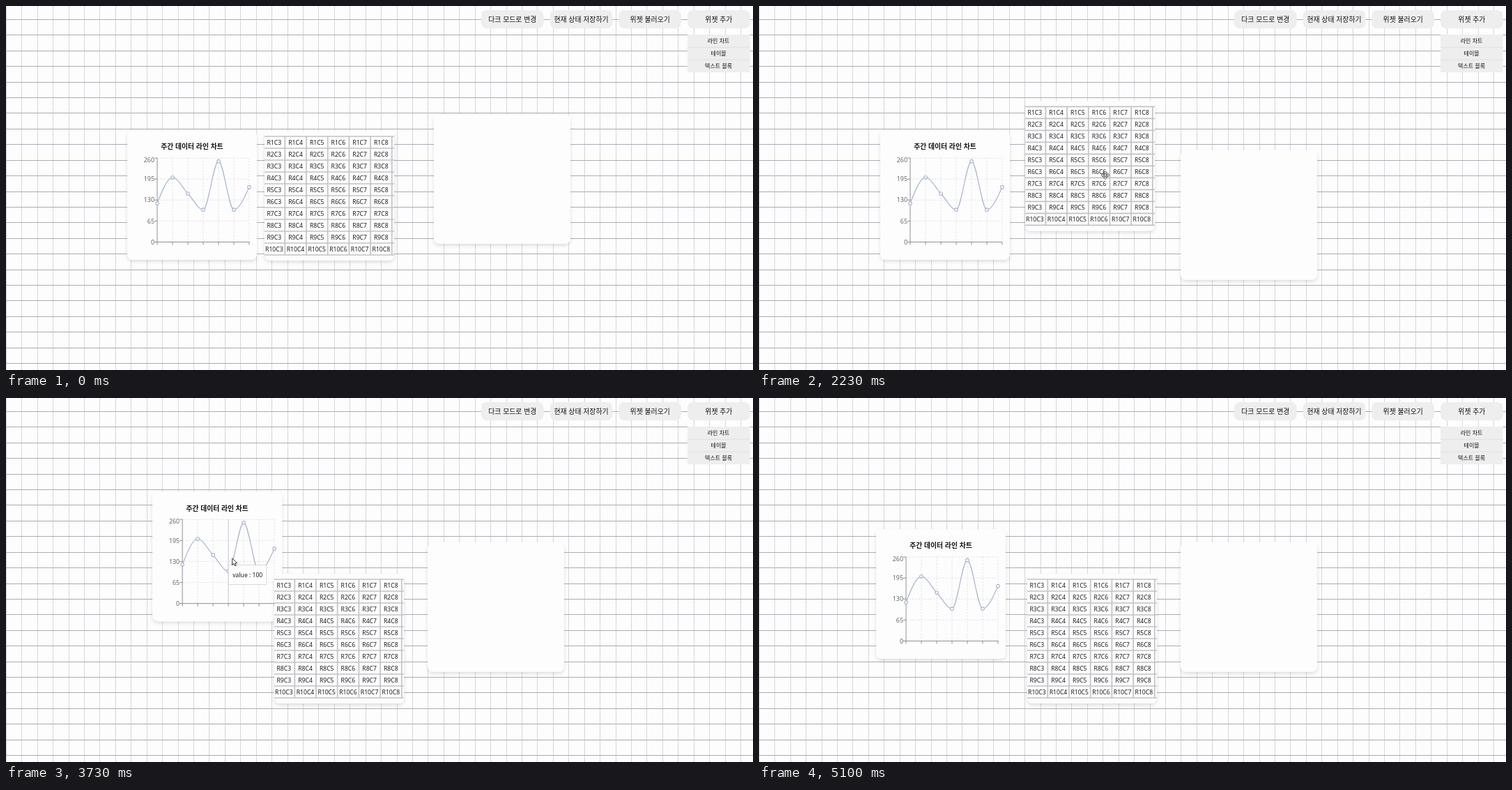
Recreate the animation shown at these times as an HTML page. Size 1072 by 522 pixels, loop 5530 ms.

```html
<!DOCTYPE html>
<html lang="ko">
<head>
<meta charset="utf-8">
<title>위젯 보드</title>
<style>
html, body { margin: 0; width: 100%; height: 100%; overflow: hidden; background: #fdfdfd; }
svg { display: block; width: 100vw; height: 100vh; }
text { font-family: "Noto Sans", "Open Sans", sans-serif; text-anchor: middle; fill: #1c1c1c; }
.ko { font-family: "Noto Sans CJK KR", "Noto Sans CJK", "Noto Sans KR", sans-serif; fill: #111; }
</style>
</head>
<body>
<svg id="stage" viewBox="0 0 1072 522" preserveAspectRatio="none">
  <defs>
    <filter id="shade" x="-10%" y="-10%" width="120%" height="120%">
      <feDropShadow dx="0" dy="2.4" stdDeviation="2.4" flood-color="#000" flood-opacity=".13"/>
    </filter>
  </defs>
</svg>
<script>
const LOOP = 5530, STEP = 100 / 3;
const stage = document.getElementById('stage');

function add(parent, tag, attrs, text) {
  const el = document.createElementNS('http://www.w3.org/2000/svg', tag);
  for (const k in attrs) el.setAttribute(k, attrs[k]);
  if (text !== undefined) el.textContent = text;
  parent.appendChild(el);
  return el;
}
const group = parent => add(parent, 'g', {});
const line = (p, d, stroke, width = 1, more = {}) =>
  add(p, 'path', { d, stroke, 'stroke-width': width, fill: 'none', ...more });
// text centred on (x, y)
const label = (p, x, y, size, str, more = {}) =>
  add(p, 'text', { x, y: y + size * 0.36, 'font-size': size, ...more }, str);
const place = (el, [x, y]) => el.setAttribute('transform', `translate(${x.toFixed(2)} ${y.toFixed(2)})`);
const show = (el, on) => el.setAttribute('visibility', on ? 'visible' : 'hidden');

// monotone cubic slopes, shared by the chart curve and the motion paths
function slopes(xs, ys) {
  const n = xs.length, h = [], s = [], m = [];
  for (let i = 0; i < n - 1; i++) {
    h[i] = xs[i + 1] - xs[i];
    s[i] = (ys[i + 1] - ys[i]) / h[i];
  }
  for (let i = 1; i < n - 1; i++) {
    const p = (s[i - 1] * h[i] + s[i] * h[i - 1]) / (h[i - 1] + h[i]);
    m[i] = (Math.sign(s[i - 1]) + Math.sign(s[i])) *
      Math.min(Math.abs(s[i - 1]), Math.abs(s[i]), Math.abs(p) / 2);
  }
  m[0] = (3 * s[0] - m[1]) / 2;
  m[n - 1] = (3 * s[n - 2] - m[n - 2]) / 2;
  return m;
}

// keys: [time, x, y]; returns t => [x, y], held outside the range
function track(keys) {
  const ts = keys.map(k => k[0]);
  const axes = [1, 2].map(a => {
    const v = keys.map(k => k[a]);
    const m = slopes(ts, v);
    m[0] = m[m.length - 1] = 0;
    return { v, m };
  });
  return t => {
    t = Math.min(Math.max(t, ts[0]), ts[ts.length - 1]);
    let i = 0;
    while (i < ts.length - 2 && t > ts[i + 1]) i++;
    const h = ts[i + 1] - ts[i], u = (t - ts[i]) / h, w = 1 - u;
    return axes.map(({ v, m }) =>
      w * w * (1 + 2 * u) * v[i] + u * u * (3 - 2 * u) * v[i + 1] +
      h * u * w * (w * m[i] - u * m[i + 1]));
  };
}

/* background */
add(stage, 'rect', { width: 1072, height: 522, fill: '#fdfdfd' });
let rows = '', cols = '';
for (let k = 0; k < 48; k++) cols += `M${Math.floor(0.3 + 22.43 * k) + 0.5} 0V522`;
for (let k = 0; k < 23; k++) rows += `M0 ${Math.floor(19.5 + 22.41 * k) + 0.5}H1072`;
line(stage, cols, '#d6d6dd');
line(stage, rows, '#acacb4');

/* toolbar */
['다크 모드로 변경', '현재 상태 저장하기', '위젯 불러오기', '위젯 추가'].forEach((name, i) => {
  const x = 682 + i * 98.7;
  add(stage, 'rect', { x, y: 6, width: 89.5, height: 26.3, rx: 8, fill: '#eeeeee' });
  label(stage, x + 44.8, 19.4, 9.9, name, { class: 'ko' });
});
add(stage, 'rect', { x: 978, y: 41, width: 89.6, height: 54, fill: '#eeeeee' });
line(stage, 'M978 59.2H1067.6M978 77.2H1067.6', '#dcdce6', 0.8);
['라인 차트', '테이블', '텍스트 블록'].forEach((name, i) =>
  label(stage, 1022.6, 50.4 + i * 18, 8, name, { class: 'ko' }));

function card(width) {
  const g = group(stage);
  add(g, 'rect', { width, height: 186, rx: 8, fill: '#fdfdfe', filter: 'url(#shade)' });
  return g;
}

/* line chart */
const chart = card(186);
label(chart, 93, 23.8, 9.8, '주간 데이터 라인 차트', { class: 'ko', 'font-weight': 700 });
const base = 160.5, px = i => 43 + 22 * i, py = v => base - v * 120.5 / 260;
const values = [120, 200, 150, 100, 250, 100, 170];
const xs = values.map((_, i) => px(i)), ys = values.map(py);
let mesh = '', ticks = '';
for (let i = 0; i < 7; i++) {
  if (i) mesh += `M${px(i)} ${py(260)}V${base}`;
  ticks += `M${px(i)} ${base}v4`;
}
for (let v = 0; v <= 260; v += 65) {
  if (v) mesh += `M43 ${py(v)}H175`;
  ticks += `M43 ${py(v)}h-4`;
  label(chart, 39, py(v) + (v === 260 ? 3 : 0), 8.9, v, { style: 'text-anchor:end;fill:#666' });
}
line(chart, mesh, '#d9d9e0', 0.8, { 'stroke-dasharray': '2.2 2.2' });
line(chart, `M43 ${py(260)}V${base}H175` + ticks, '#85858c', 0.9);
const hair = line(chart, `M${px(3)} ${py(260)}V${base}`, '#c8c8d0', 0.9);
const slope = slopes(xs, ys);
let curve = `M${xs[0]} ${ys[0]}`;
for (let i = 0; i < 6; i++) {
  const d = 22 / 3;
  curve += `C${xs[i] + d} ${ys[i] + d * slope[i]} ${xs[i + 1] - d} ${ys[i + 1] - d * slope[i + 1]} ${xs[i + 1]} ${ys[i + 1]}`;
}
line(chart, curve, '#a9b5ca', 1.2);
xs.forEach((cx, i) =>
  add(chart, 'circle', { cx, cy: ys[i], r: 2.3, fill: '#fff', stroke: '#a9b5ca', 'stroke-width': 1.1 }));
const tip = group(chart);
add(tip, 'rect', { x: 109.2, y: 105.2, width: 54.6, height: 28, fill: '#fefefe', stroke: '#cfcfd6', 'stroke-width': 0.8 });
label(tip, 136.6, 119.8, 8.6, 'value : 100');

/* table */
const table = card(186);
add(table, 'rect', { width: 186, height: 12, fill: '#fdfdfe' });
let rules = '';
for (let r = 0; r <= 10; r++) rules += `M0 ${8 + 17 * r}H186`;
for (let c = 0; c < 6; c++) rules += `M${29.3 + 30.7 * c} 7.2V178.8`;
line(table, rules, '#c3c3c8', 1.7);
for (let r = 1; r <= 10; r++)
  for (let c = 3; c <= 8; c++)
    label(table, 13.8 + 30.7 * (c - 3), 16.6 + 17 * (r - 1), 8.6, `R${r}C${c}`);

/* text block */
const note = card(196);
const focus = group(note);
add(focus, 'rect', { x: 7.6, y: 8.6, width: 180.8, height: 168, rx: 2, fill: '#fefefe', stroke: '#151515', 'stroke-width': 1.5 });
line(focus, 'M9.3 11V17.5', '#555', 0.8);

/* pointers */
const ink = { stroke: '#222', 'stroke-width': 0.9, 'stroke-linejoin': 'round' };
const arrow = add(stage, 'path', { d: 'M0 0V9.6L2.2 7.6L3.8 11L5.4 10.3L3.9 7H7Z', fill: '#fff', ...ink });
const beam = line(stage, 'M-2 -4.2H-.5L0 -3.8L.5 -4.2H2M0 -3.8V3.8M-2 4.2H-.5L0 3.8L.5 4.2H2', '#222', 0.9);
const mover = group(stage);
for (let a = 0; a < 360; a += 90)
  add(mover, 'path', { d: 'M0 -6L2.4 -3.4H1V-1H-1V-3.4H-2.4Z', fill: '#fff', ...ink, 'stroke-width': 0.8, transform: `rotate(${a})` });
add(mover, 'rect', { x: -1, y: -1, width: 2, height: 2, fill: '#fff' });

/* motion */
const notePath = track([[570, 614, 155], [700, 630, 126], [820, 660, 114], [940, 679, 122], [1060, 670, 144],
  [1170, 650, 164], [1300, 628, 197], [1433, 611, 205.6], [1470, 605, 206.8]]);
const tablePath = track([[1870, 371, 179], [2020, 300, 172], [2130, 334, 152], [2233, 382, 136.5], [2267, 387, 133.5],
  [2567, 412, 144.5], [2830, 418, 184], [2900, 422, 206], [2990, 388, 234], [3033, 385, 238], [3180, 385, 252]]);
const chartPath = track([[3480, 174, 178], [3650, 203, 150], [3830, 213, 118], [3970, 190, 107], [4100, 150, 105],
  [4233, 122, 121], [4330, 125, 148], [4530, 150, 174], [4700, 168, 188]]);

// while dragging, the pointer runs one step ahead of its card
const drags = [
  { from: 570, to: 1500, path: notePath, grab: [76, 118], pointer: beam },
  { from: 1870, to: 3230, path: tablePath, grab: [110, 109], pointer: mover },
  { from: 3480, to: 4700, path: chartPath, grab: [113, 102], pointer: arrow }
];
const held = (d, t) => d.path(t + STEP).map((v, i) => v + d.grab[i]);
const enter = { t: 30, at: [1074, 150] }, leave = { t: 5000, at: [330, 530] };

function pointerAt(t) {
  let last = enter;
  for (const d of drags) {
    if (t < d.from) return travel(last, { t: d.from, at: held(d, d.from) }, t);
    if (t <= d.to) return held(d, t);
    last = { t: d.to, at: held(d, d.to) };
  }
  return travel(last, leave, t);
}
function travel(a, b, t) {
  const u = Math.min(Math.max((t - a.t) / (b.t - a.t), 0), 1), e = u * u * (3 - 2 * u);
  return a.at.map((v, i) => v + (b.at[i] - v) * e);
}
const inside = ([x, y], [cx, cy], w) => x > cx && x < cx + w && y > cy && y < cy + 186;

function draw(ms) {
  const t = Math.floor((ms % LOOP + 3.4) / STEP) * STEP;
  const notePos = notePath(t), tablePos = tablePath(t), chartPos = chartPath(t), p = pointerAt(t);
  place(note, notePos);
  place(table, tablePos);
  place(chart, chartPos);
  show(focus, t >= 540 && t < 1870);
  const hover = t >= 3440 && t < 4760;
  show(tip, hover);
  show(hair, hover);

  const drag = drags.find(d => t >= d.from && t <= d.to);
  const shape = drag ? drag.pointer : inside(p, notePos, 196) ? beam : inside(p, tablePos, 186) ? mover : arrow;
  for (const el of [arrow, beam, mover]) {
    place(el, p);
    show(el, el === shape && t > enter.t + 10 && t < leave.t);
  }
}

const start = performance.now();
function tick() {
  draw(performance.now() - start);
  requestAnimationFrame(tick);
}
tick();
</script>
</body>
</html>
```
